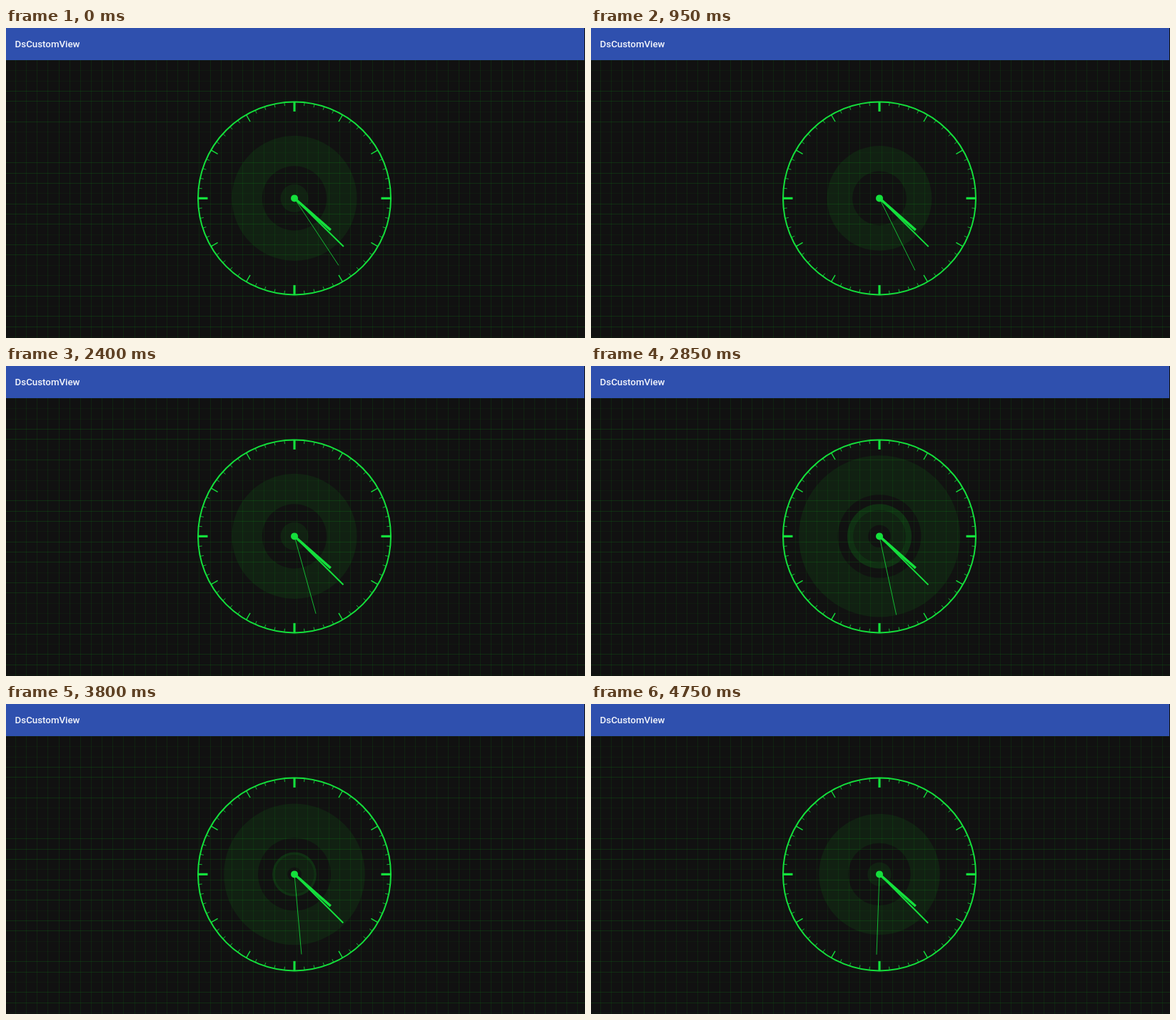
Animation of 811x434 px, one loop 4.8 s. Source, as an HTML page with a canvas:

```html
<!DOCTYPE html>
<html lang="en">
<head>
<meta charset="utf-8">
<title>DsCustomView</title>
<style>
html, body { margin: 0; width: 100%; height: 100%; overflow: hidden; background: #111; }
canvas { display: block; }
</style>
</head>
<body>
<canvas id="stage" width="811" height="434"></canvas>
<script>
const ctx = document.getElementById('stage').getContext('2d');
const LOOP = 4800, STEP = 50, WAVE = 2400;
const CX = 404, CY = 238.4, RADIUS = 135, REACH = 136;
const GREEN = '#14e03c';
const STRONG_ROWS = [3, 4, 6, 10, 11, 12, 14, 15, 16, 18, 19, 22, 23, 25, 26];

function drawBackground() {
  ctx.fillStyle = '#111';
  ctx.fillRect(0, 0, 811, 434);
  ctx.fillStyle = 'rgba(16, 150, 24, .14)';
  for (let x = 13; x < 811; x += 15.14) ctx.fillRect(Math.round(x), 45, 1, 389);
  for (let row = 0; row < 28; row++) {
    ctx.fillStyle = `rgba(16, 150, 24, ${STRONG_ROWS.includes(row) ? .2 : .06})`;
    ctx.fillRect(0, Math.round(45 + row * 14.33), 811, 1);
  }
  ctx.fillStyle = '#2f50ae';
  ctx.fillRect(0, 0, 810, 45);
  ctx.fillStyle = '#f4f6fc';
  ctx.font = '500 13.3px Roboto, sans-serif';
  ctx.fillText('DsCustomView', 12.6, 27);
}

function drawRing(inner, outer, alpha) {
  if (outer <= inner) return;
  ctx.beginPath();
  ctx.arc(0, 0, outer, 0, 2 * Math.PI);
  ctx.arc(0, 0, Math.max(0, inner), 0, 2 * Math.PI, true);
  ctx.fillStyle = `rgba(16, 220, 36, ${alpha})`;
  ctx.fill();
}

// A young wave has a bright rim; past half its reach it becomes one even band.
function drawWave(progress) {
  const r = REACH * progress;
  if (progress >= .5) {
    drawRing(r * .515, r, .075);
  } else {
    const rim = Math.min(r, 7 + r * .66);
    drawRing(r * .42 - 3.2, rim, .075);
    drawRing(rim, r, .15);
  }
}

// Angle in degrees clockwise from twelve o'clock.
function spoke(angle, from, to, width) {
  const a = angle * Math.PI / 180, x = Math.sin(a), y = -Math.cos(a);
  ctx.beginPath();
  ctx.moveTo(x * from, y * from);
  ctx.lineTo(x * to, y * to);
  ctx.lineWidth = width;
  ctx.stroke();
}

function drawDial() {
  ctx.strokeStyle = GREEN;
  ctx.lineWidth = 2;
  ctx.beginPath();
  ctx.arc(0, 0, RADIUS, 0, 2 * Math.PI);
  ctx.stroke();
  for (let i = 0; i < 60; i++) {
    const [length, width] = i % 15 === 0 ? [13.5, 3.2] : i % 5 === 0 ? [11, 1.4] : [5, .8];
    spoke(i * 6, RADIUS - length, RADIUS, width);
  }
}

function drawHands(t) {
  const second = 146.6 + t * .00746;
  const minute = 132 + second / 60;
  const hour = 120 + minute / 12;
  spoke(hour, 0, 67.5, 3.4);
  spoke(minute, 0, 96.5, 2);
  spoke(second, 0, 112.5, .8);
  ctx.beginPath();
  ctx.arc(0, 0, 5, 0, 2 * Math.PI);
  ctx.fillStyle = GREEN;
  ctx.fill();
}

function frame() {
  const t = Math.floor(performance.now() % LOOP / STEP) * STEP;
  drawBackground();
  ctx.save();
  ctx.translate(CX, CY);
  const phase = (t + 1545) % WAVE / WAVE;
  drawWave(phase);
  drawWave((phase + .5) % 1);
  drawDial();
  drawHands(t);
  ctx.restore();
  requestAnimationFrame(frame);
}
frame();
</script>
</body>
</html>
```
